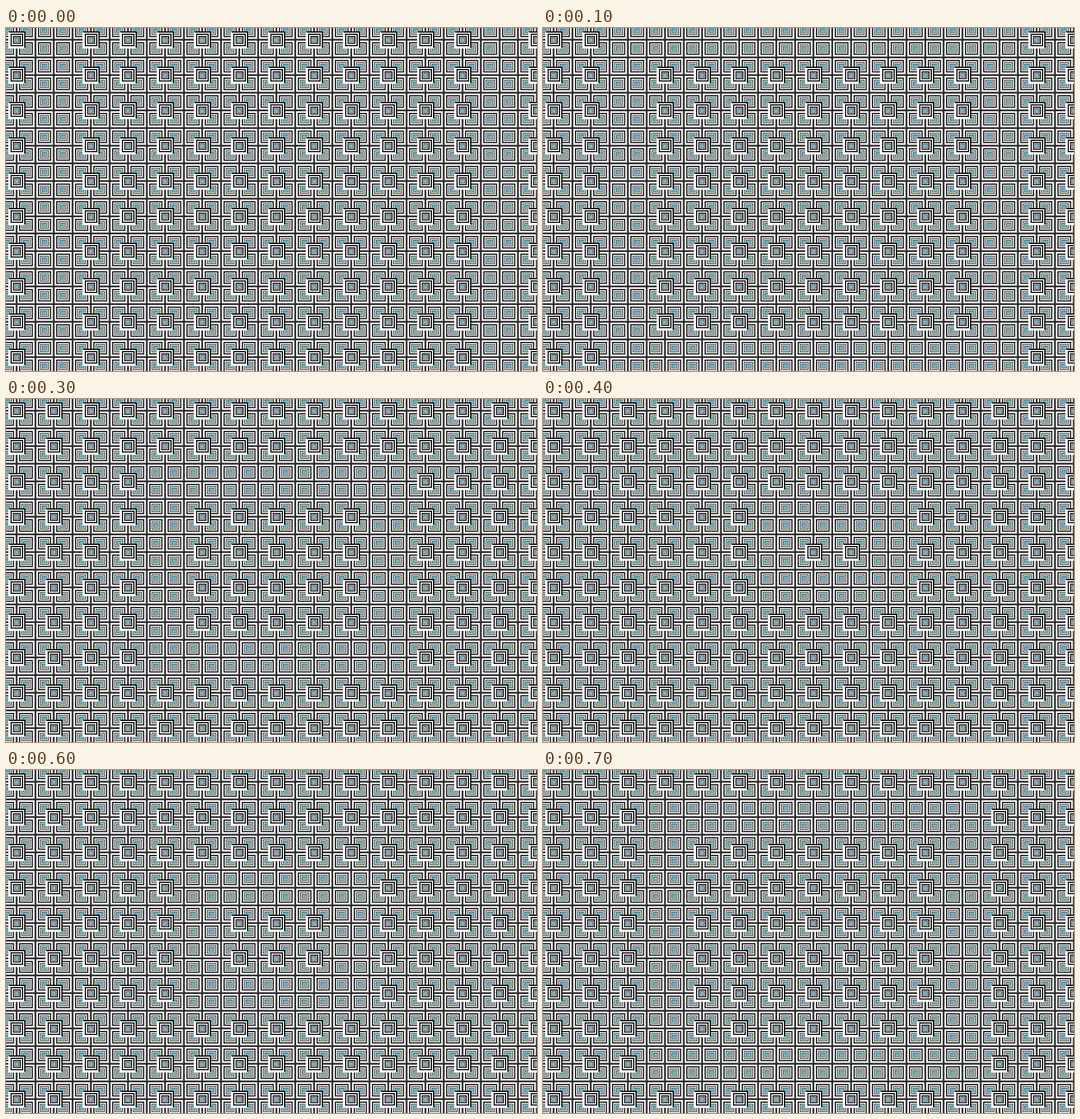
Animation of 930x602 px, one loop 0.8 s. Source, as an HTML page with a canvas:

```html
<!DOCTYPE html>
<html>
<head>
<meta charset="utf-8">
<style>
html, body { margin: 0; width: 100%; height: 100%; overflow: hidden; background: #fff; }
canvas { display: block; }
</style>
</head>
<body>
<canvas id="stage" width="930" height="602"></canvas>
<script>
const stage = document.getElementById('stage');
const ctx = stage.getContext('2d');
const floor = document.createElement('canvas');
floor.width = 930;
floor.height = 602;

const PX = 65.07, PY = 61.9, X0 = 19, Y0 = 21;
const COLS = 15, ROWS = 10;

// Nested layers: inset, upper colour, lower colour
const base = [
  [0, '#111', '#444'], [2, '#f4f4f4', '#e8e8e8'],
  [5, '#1c1c1c', '#2c2c2c'], [7, '#e4e4e4', '#dcdcdc'],
  [9, '#333', '#444'], [10, '#c8c8c8', '#bcbcbc'],
  [12, '#555', '#808080'], [13, '#48bcd8', '#7cacb8']
];
const raised = [
  [0, '#000', '#fff'], [2, '#f4f4f4', '#fff'],
  [4, '#0c0c0c', '#141414'], [6, '#ececec', '#f4f4f4'],
  [8, '#222', '#333'], [10, '#ccc', '#c0c0c0'],
  [11, '#555', '#777'], [12, '#70b4c4', '#8cb0b8']
];

// Rectangle with its lower half, right (side 1) or left (side 0), in a second shade
function bevel(g, x0, y0, x1, y1, upper, lower, side) {
  g.fillStyle = upper;
  g.fillRect(x0, y0, x1 - x0, y1 - y0);
  g.fillStyle = lower;
  g.beginPath();
  g.moveTo(side ? x1 : x0, y0);
  g.lineTo(x1, y1);
  g.lineTo(x0, y1);
  g.fill();
}

function floorTile(g, x0, y0, x1, y1) {
  for (const [d, a, b] of base) {
    const t = Math.max(0, d - 1);
    bevel(g, x0 + t, y0 + t, x1 - d, y1 - d, a, b, 1);
  }
}

function block(col, row) {
  const x = Math.round(X0 + col * PX), y = Math.round(Y0 + row * PY);
  for (const [d, a, b] of raised) {
    const h = 15 - d;
    bevel(ctx, x - h, y - h, x + h, y + h, a, b, 0);
  }
}

const fg = floor.getContext('2d');
const edgeX = i => Math.round(X0 + i * PX / 2);
const edgeY = j => Math.round(Y0 + j * PY / 2);
for (let i = -1; i < 2 * COLS; i++)
  for (let j = -1; j < 2 * ROWS; j++)
    floorTile(fg, edgeX(i), edgeY(j), edgeX(i + 1), edgeY(j + 1));

// Each step removes one rectangular ring of blocks: left, top, right, bottom
const ring = k => [k, k - 2, 14 - k, 11 - k];
const steps = [ring(1), ring(2), ring(0), ring(4), [6, 3, 9, 5], [7, 4, 8, 4], ring(5), ring(3)];

function onRing(c, r, [l, t, right, b]) {
  const inside = c >= l && c <= right && r >= t && r <= b;
  return inside && (c === l || c === right || r === t || r === b);
}

let start;
function draw(now) {
  start ??= now;
  const gap = steps[Math.floor((now - start) / 100) % steps.length];
  ctx.drawImage(floor, 0, 0);
  for (let r = 0; r < ROWS; r++)
    for (let c = 0; c < COLS; c++)
      if (!onRing(c, r, gap)) block(c, r);
  requestAnimationFrame(draw);
}
requestAnimationFrame(draw);
</script>
</body>
</html>
```
